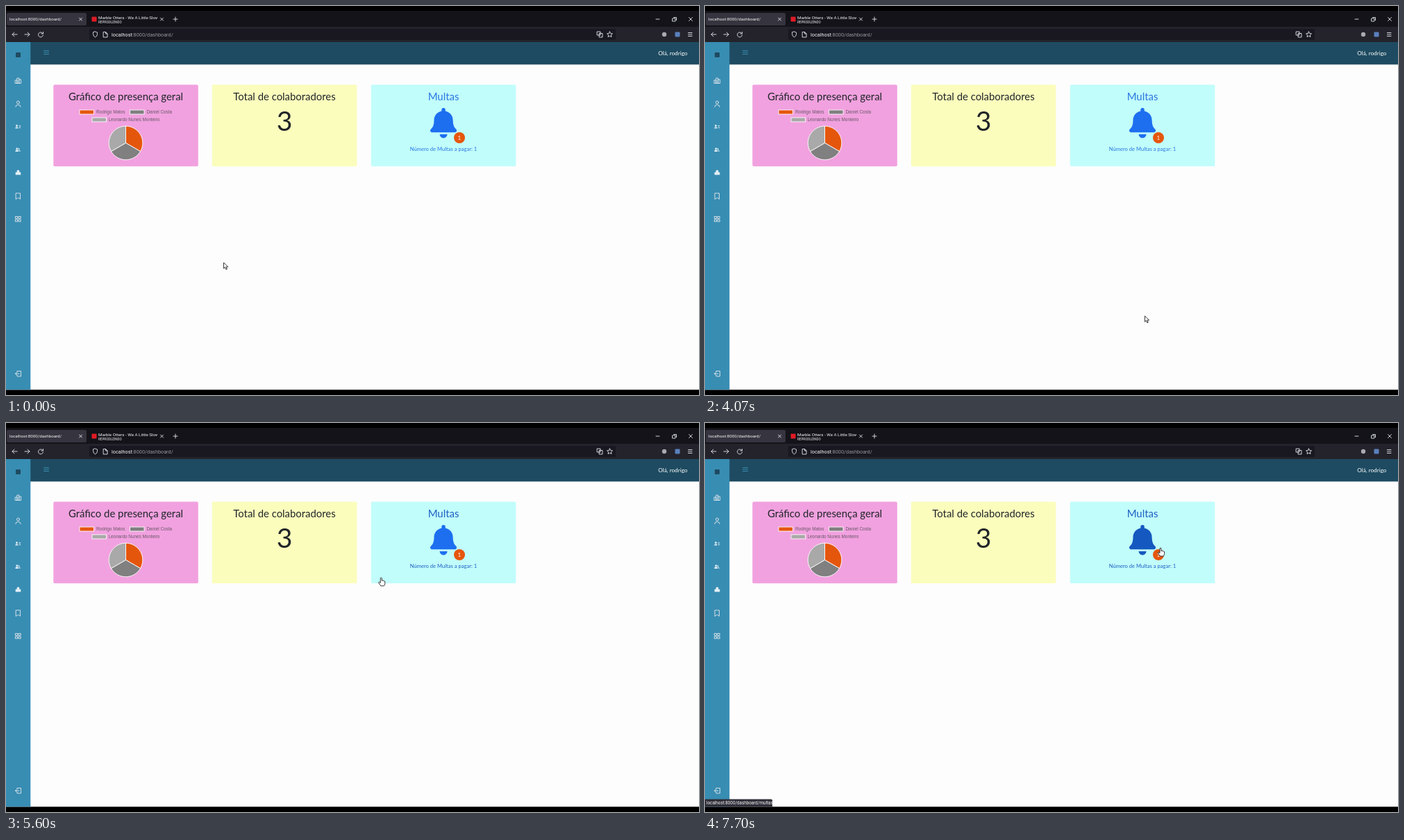
Write an HTML page that moves like this. It is 998 px wide and 561 px high and loops after 8000 ms.

```html
<!DOCTYPE html>
<html lang="pt-BR">
<head>
<meta charset="utf-8">
<title>Dashboard</title>
<style>
  html, body { margin: 0; width: 100%; height: 100%; overflow: hidden; background: #000; }
  svg { display: block; width: 100vw; height: 100vh; }
  text { font-family: Roboto, "Open Sans", sans-serif; fill: #f4f4f6; }
  .page text { font-family: Lato, "Open Sans", sans-serif; fill: #212529; }
  .page .legend text { font: 6.4px "Liberation Sans", Arial, sans-serif; fill: #6a5868; }
  .mid { text-anchor: middle; }
  .title { font-size: 14.9px; }
  .line { fill: none; stroke: #e4e8ec; stroke-width: .9; stroke-linecap: round; stroke-linejoin: round; }
  .solid { fill: #e4f0f6; }
  .page .link text { fill: var(--ink); }
  .page .badge text { fill: #fff; font-size: 8px; }
</style>
</head>
<body>
<svg viewBox="0 0 998 561" preserveAspectRatio="none">
  <rect width="998" height="561"/>

  <!-- browser window -->
  <rect y="7" width="998" height="23" fill="#14131a"/>
  <rect y="30" width="998" height="22" fill="#24232c"/>
  <rect x="1" y="10" width="115" height="18" rx="2" fill="#35343f"/>
  <rect x="120" y="33" width="758" height="16" rx="2" fill="#191820"/>
  <text x="5" y="21.3" font-size="6.2">localhost:8000/dashboard/</text>
  <rect x="123.5" y="15.5" width="7" height="7" rx="1" fill="#e01b24"/>
  <clipPath id="tab"><rect x="133" y="8" width="85" height="20"/></clipPath>
  <g clip-path="url(#tab)">
    <text x="133" y="18.5" font-size="6.2">Marble Otters - We A Little Slow</text>
    <text x="133" y="25" font-size="4.6">REPRODUZINDO</text>
  </g>
  <text x="152" y="43.8" font-size="7.3">localhost<tspan fill="#9695a0">:8000/dashboard/</tspan></text>
  <g class="line">
    <path d="M105.5 17l4 4m0-4l-4 4M222.5 17l4 4m0-4l-4 4M241 19h6m-3-3v6"/>
    <path d="M936 19h5M983.5 16.5l5 5m0-5l-5 5M960 18h4v4h-4zM961.5 16.5h4v4"/>
    <path d="M16 41H9m3-3l-3 3 3 3M27 41h7m-3-3l3 3-3 3"/>
    <path d="M53 39.5a3.5 3.5 0 1 0 .5 2.5M53.5 37.5v2.5h-2.5"/>
    <path d="M128.5 37l3 1.2v2.3q0 3-3 4.5-3-1.5-3-4.5v-2.3zM140.500 37.5h3l2.5 2.5v5h-5.5zM143.5 37.5v2.5h2.5"/>
    <path d="M851.5 37h4.5v5h-4.5zM854.5 39.5h4.5v5.5h-4.5z"/>
    <path d="M869.5 37l1.2 2.6 2.8.3-2.1 1.9.6 2.8-2.5-1.4-2.5 1.4.6-2.8-2.1-1.9 2.8-.3z"/>
    <path d="M982.5 38.5h5.5m-5.5 2.5h5.5m-5.5 2.5h5.5"/>
  </g>
  <circle cx="948" cy="41" r="3.2" fill="#a9a9b2"/>
  <rect x="963.5" y="37.5" width="7" height="7" rx="1" fill="#5a80bd"/>

  <!-- page -->
  <g class="page">
    <rect y="52" width="998" height="501.4" fill="#fdfdfd"/>
    <rect x="35" y="52" width="963" height="32.4" fill="#1e4b61"/>
    <rect y="52" width="35.3" height="501.4" fill="#388db3"/>
    <path class="line" style="stroke:#3b8fb5" d="M54.5 64.5h7m-7 2.5h7m-7 2.5h7"/>
    <text x="981.5" y="71" font-size="8.2" text-anchor="end" style="fill:#fff">Olá, rodrigo</text>

    <rect x="14" y="67" width="7" height="7" rx="1" fill="#1e4b61"/>
    <g class="line">
      <path d="M13.5 107h2.7v4.5h-2.7zM16.2 104h2.7v7.5h-2.7zM18.9 106h2.7v5.5h-2.7z"/>
      <circle cx="17.5" cy="139" r="2"/><path d="M13.8 145.5q0-3 3.7-3t3.7 3"/>
      <path d="M14.5 270h6v8.5l-3-2-3 2z"/>
      <path d="M13.8 303.5h2.9v2.9h-2.9zM18.3 303.5h2.9v2.9h-2.9zM13.8 308h2.9v2.9h-2.9zM18.3 308h2.9v2.9h-2.9z"/>
      <path d="M16 528v-1.5h5.5v7.5H16v-1.5M19 530.3h-5.5m2-1.8l-2 1.8 2 1.8"/>
    </g>
    <g class="solid">
      <circle cx="15.5" cy="172.7" r="1.4"/>
      <path d="M13.2 176.6q0-2.2 2.3-2.2t2.3 2.2zM18.5 172h2.6v.8h-2.6zM18.500 173.7h2.6v.8h-2.6zM19 175.4h2.1v.8H19z"/>
      <circle cx="15.8" cy="206" r="1.4"/>
      <path d="M13.3 210q0-2.4 2.5-2.4t2.5 2.4zM17.7 204.800q2.2 0 1.4 2.600 1.600.6 1.600 2.600h-1.200q-.2-1.700-1.400-2.400z"/>
      <path d="M13.7 243.500v-3.700h2v-2.500l1.800-.8 1.800.8v2.500h2v3.700z"/>
    </g>

    <rect x="68.3" y="113.5" width="208.5" height="117.8" rx="2" fill="#f1a1df"/>
    <rect x="296.800" y="113.5" width="208.5" height="117.8" rx="2" fill="#fbfdbc"/>
    <rect x="525.8" y="113.5" width="208.5" height="117.8" rx="2" fill="#c1fdfb"/>

    <text class="mid title" x="172.5" y="136.3">Gráfico de presença geral</text>
    <g class="legend">
      <g stroke="#fff" stroke-opacity=".85">
        <rect x="106" y="150" width="20.5" height="6" fill="#e5560d"/>
        <rect x="178.5" y="150" width="20.5" height="6" fill="#808080"/>
        <rect x="124" y="161" width="20.5" height="6" fill="#a9a9a9"/>
      </g>
      <text x="130" y="154.8">Rodrigo Matos</text>
      <text x="202.5" y="154.8">Daniel Costa</text>
      <text x="147.5" y="165.8">Leonardo Nunes Monteiro</text>
    </g>
    <g id="pie" stroke="#fff" stroke-opacity=".9" transform="translate(172.5 197.5)"></g>

    <text class="mid title" x="401" y="136.3">Total de colaboradores</text>
    <text class="mid" x="401" y="180" font-size="39">3</text>

    <g class="link" id="link">
      <text class="mid title" x="630" y="136.3">Multas</text>
      <path id="bell" transform="translate(611 147) scale(.085)" d="M224 512c35 0 64-29 64-64H160c0 35 29 64 64 64zM439 362c-19-21-55-52-55-154 0-78-54-140-128-155V32a32 32 0 0 0-64 0v21C118 68 64 130 64 208c0 102-36 133-55 154-19 20-6 54 23 54h384c29 0 42-34 23-54z"/>
      <text class="mid" x="630" y="209" font-size="7.6">Número de Multas a pagar: 1</text>
    </g>
    <g class="badge">
      <circle cx="653" cy="190" r="8" fill="#e5560d"/>
      <text class="mid" x="652.8" y="193">1</text>
    </g>
  </g>

  <g id="status">
    <path d="M0 542.5h95q2 0 2 2v8.9H0z" fill="#302f39"/>
    <text x="2" y="550.3" font-size="6.3">localhost:8000/dashboard/multas</text>
  </g>

  <g id="cursor" fill="#fff" stroke="#222" stroke-width=".9" stroke-linejoin="round">
    <path id="arrow" d="M0 0v8.5l2-1.8 1.4 3.3 1.5-.7-1.4-3.1h2.7z"/>
    <path id="hand" d="M-1 .8q1-1.6 2 0v3.7q1-.7 1.7.2 1-.5 1.6.3 1.1-.2 1.2 1v2.5q0 2-1.3 3.5H-.5q-2-2.5-3.3-5 .5-1.3 2.8.5z"/>
  </g>
</svg>

<script>
const LOOP = 8000;
const $ = id => document.getElementById(id);

// Pointer tip: time, x, y
const path = [
  [3530, 313.5, 370], [4070, 633, 447], [4450, 688, 285], [4900, 698, 132],
  [5400, 490, 243], [5600, 540, 223], [6070, 656, 180]
];

function slope(i, axis) {
  const a = path[i - 1], b = path[i + 1];
  return a && b ? (b[axis] - a[axis]) / (b[0] - a[0]) : 0;
}

// Cubic Hermite curve through the pointer path
function pointer(t) {
  const last = path.length - 1;
  if (t <= path[0][0]) return path[0].slice(1);
  if (t >= path[last][0]) return path[last].slice(1);
  const i = path.findIndex(p => p[0] > t) - 1;
  const a = path[i], b = path[i + 1], span = b[0] - a[0], s = (t - a[0]) / span;
  const ease = s * s * (3 - 2 * s);
  return [1, 2].map(k => a[k] + (b[k] - a[k]) * ease
    + span * (slope(i, k) * s * (1 - s) ** 2 - slope(i + 1, k) * s * s * (1 - s)));
}

const overCard = ([x, y]) => x > 526 && x < 734 && y > 114 && y < 231;
const show = (id, on) => $(id).setAttribute("visibility", on ? "visible" : "hidden");

function drawPie() {
  const r = 24.3, point = k => {
    const a = k * Math.PI * 2 / 3;
    return `${r * Math.sin(a)} ${-r * Math.cos(a)}`;
  };
  $("pie").innerHTML = ["#e5560d", "#808080", "#a9a9a9"].map((fill, k) =>
    `<path fill="${fill}" d="M0 0L${point(k)}A${r} ${r} 0 0 1 ${point(k + 1)}z"/>`).join("");
}

function draw(t) {
  const tip = pointer(t), over = overCard(tip);
  $("cursor").setAttribute("transform", `translate(${tip})`);
  show("arrow", !over);
  show("hand", over);
  show("status", t >= 6230);
  $("link").style.setProperty("--ink", over ? "#1d5fc4" : "#2b76e2");
  // The icon takes its hover colour slightly later than the text
  $("bell").setAttribute("fill", overCard(pointer(t - 80)) ? "#1559c0" : "#1d6ff0");
}

drawPie();
const start = performance.now();
function frame() {
  draw((performance.now() - start) % LOOP);
  requestAnimationFrame(frame);
}
frame();
</script>
</body>
</html>
```
